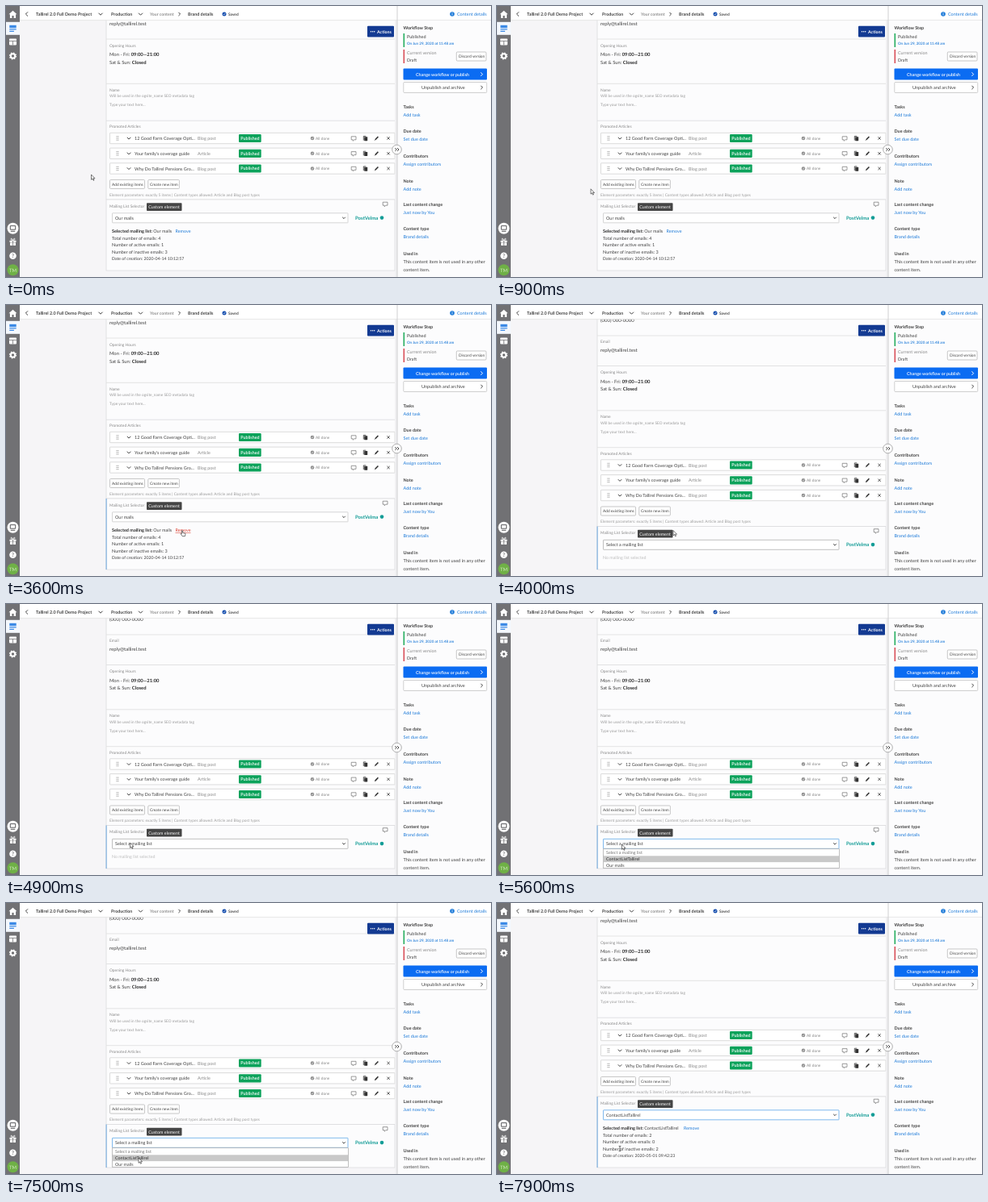
An HTML page for the animation above (8 s loop, 600 by 336 pixels).

```html
<!DOCTYPE html>
<html lang="en">
<head>
<meta charset="utf-8">
<title>Content editor</title>
<style>
  html, body { margin: 0; width: 100%; height: 100%; overflow: hidden; background: #f6f5f7; }
  svg { display: block; width: 600px; height: 336px; font-family: Lato, "Open Sans", sans-serif; text-rendering: geometricPrecision; }
  text { white-space: pre; }
</style>
</head>
<body>
<svg id="stage" viewBox="0 0 600 336"></svg>
<script>
const LOOP = 8000, SHIFT = 34.5;
const INK = '#404040', LABEL = '#878787', HINT = '#9a9a9a', LINK = '#1b79d8', LINE = '#dcdcde';
const stage = document.getElementById('stage');

function el(parent, tag, attrs, content) {
  const node = document.createElementNS('http://www.w3.org/2000/svg', tag);
  for (const key in attrs) node.setAttribute(key, attrs[key]);
  if (content !== undefined) node.textContent = content;
  parent.appendChild(node);
  return node;
}
const group = parent => el(parent, 'g', {});
const rect = (p, x, y, width, height, fill, more) => el(p, 'rect', { x, y, width, height, fill, ...more });
const circle = (p, cx, cy, r, fill, more) => el(p, 'circle', { cx, cy, r, fill, ...more });
const label = (p, x, y, str, size, fill = INK, weight = 400, more) =>
  el(p, 'text', { x, y, 'font-size': size, fill, 'font-weight': weight, ...more }, str);
const stroke = (p, d, color = INK, width = .8, more) =>
  el(p, 'path', { d, fill: 'none', stroke: color, 'stroke-width': width, ...more });
const box = (p, x, y, w, h, color, r = 1, fill = '#fff', width = .7) =>
  rect(p, x, y, w, h, fill, { rx: r, stroke: color, 'stroke-width': width });
const down = (p, x, y, s = 2.2, color = INK) =>
  stroke(p, `M${x - s} ${y - s / 2}l${s} ${s}l${s} ${-s}`, color, 1);
const right = (p, x, y, s = 2.2, color = INK) =>
  stroke(p, `M${x - s / 2} ${y - s}l${s} ${s}l${-s} ${s}`, color, 1);
const show = (node, on) => node.setAttribute('display', on ? 'inline' : 'none');

function bubble(p, x, y) {
  stroke(p, `M${x - 2.8} ${y - 2.2}h5.8v4h-2.2l-1.6 1.5v-1.5h-2z`, '#666', .65);
}

function articleRow(p, y, name, kind) {
  box(p, 128.5, y - 6.7, 352.5, 13.4, '#cdcdcd', .5);
  for (const dx of [0, 1.8])
    for (const dy of [-2.2, 0, 2.2]) rect(p, 136.5 + dx, y + dy - .5, 1, 1, '#8a8a8a');
  down(p, 152, y);
  label(p, 159, y + 2, name, 5.5);
  label(p, 237, y + 2, kind, 5.5, LABEL);
  rect(p, 288, y - 5.1, 27.7, 10.2, '#0ca25b', { rx: 1 });
  label(p, 290.3, y + 1.9, 'Published', 5.4, '#fff', 600);
  circle(p, 379, y, 2.3, '#8f8f8f');
  stroke(p, `M377.9 ${y}l.8 .9l1.5 -1.8`, '#fff', .6);
  label(p, 383, y + 1.8, 'All done', 4.8, LABEL);
  bubble(p, 430, y);
  stroke(p, `M442.3 ${y + 2.6}v-5.2h3`, '#333', .8);
  rect(p, 443.2, y - 1.8, 4, 5, '#333', { rx: .4 });
  stroke(p, `M456.8 ${y + 1.8}l3.6 -3.8`, '#333', 1.6);
  stroke(p, `M456 ${y + 2.7}l.8 -1`, '#333', .8);
  stroke(p, `M471.4 ${y - 1.7}l3.4 3.4m0 -3.4l-3.4 3.4`, '#333', .8);
}

function smallButton(p, x, y, w, h, str, tx) {
  box(p, x, y, w, h, '#b0b0b0');
  label(p, tx, y + h / 2 + 1.7, str, 4.8);
}

// Scrolling column
rect(stage, 0, 0, 600, 336, '#f6f5f7');
const page = group(stage);
rect(page, 124, -60, 357, 300, '#fcfcfd');
stroke(page, 'M124 -60V240', LINE, .8);
for (const y of [3.5, 41, 96.3, 142.2, 240]) stroke(page, `M124 ${y}H481`, LINE, .8);
label(page, 128, -13.7, '(000) 000-0000', 6);
label(page, 128, 12.2, 'Email', 4.9, LABEL);
label(page, 128, 23.8, 'reply@tallirel.test', 6);
label(page, 128, 50.6, 'Opening Hours', 4.9, LABEL);
for (const [y, day, hours] of [[62.2, 'Mon - Fri: ', '09:00—21:00'], [71.5, 'Sat & Sun: ', 'Closed']]) {
  const line = label(page, 128, y, '', 5.85);
  el(line, 'tspan', {}, day);
  el(line, 'tspan', { 'font-weight': 700, fill: '#2a2a2a' }, hours);
}
label(page, 128, 105.8, 'Name', 4.9, LABEL);
label(page, 128, 113.2, 'Will be used in the ogsite_name SEO metadata tag', 4.75, HINT);
label(page, 128, 124.3, 'Type your text here...', 4.85, HINT);
label(page, 128, 151.3, 'Promoted Articles', 4.9, LABEL);
articleRow(page, 164, '12 Good Farm Coverage Opti...', 'Blog post');
articleRow(page, 182.8, "Your family's coverage guide", 'Article');
articleRow(page, 201.5, 'Why Do Tallirel Pensions Gro...', 'Blog post');
smallButton(page, 128.5, 215.5, 43, 11, 'Add existing items', 131);
smallButton(page, 175.8, 215.5, 38.6, 11, 'Create new item', 178);
label(page, 128, 235.6, 'Element parameters: exactly 5 items | Content types allowed: Article and Blog post types', 4.8, HINT);

// Mailing list block
const block = group(page);
const panel = rect(block, 124, 240, 357, 88, '#fcfcfd', { stroke: LINE, 'stroke-width': .8 });
const edge = rect(block, 123.6, 240, 1, 88, '#6aa5dc');
label(block, 128, 249.7, 'Mailing List Selector', 4.9, LABEL);
rect(block, 174, 244.2, 43.5, 9.8, '#454545', { rx: .8 });
label(block, 176.3, 251, 'Custom element', 5.35, '#fff');
bubble(block, 469, 245.4);
const field = box(block, 131.5, 256.8, 291.5, 12, '#c4c4c4', .5);
const choice = label(block, 135, 264.8, '', 5.5);
down(block, 418, 262.7, 1.8);
label(block, 432, 264.8, 'PostVelma', 6.05, '#149d97', 700);
circle(block, 465, 262.6, 2.3, '#149d97');

function infoPanel(list, removeX, total, active, inactive, date) {
  const g = group(block);
  const line = label(g, 131, 281, '', 5.5);
  el(line, 'tspan', { 'font-weight': 700, fill: '#2a2a2a' }, 'Selected mailing list: ');
  el(line, 'tspan', {}, list);
  const link = label(g, removeX, 281, 'Remove', 5.4, LINK);
  label(g, 131, 289.8, 'Total number of emails: ' + total, 5.5);
  label(g, 131, 298.2, 'Number of active emails: ' + active, 5.5);
  label(g, 131, 306.7, 'Number of inactive emails: ' + inactive, 5.5);
  label(g, 131, 315.3, 'Date of creation: ' + date, 5.2);
  return { g, link };
}
const LISTS = ['Our mails', 'ContactListTallirel'];
const before = infoPanel(LISTS[0], 209.5, 4, 1, 3, '2020-04-14 10:12:57');
const after = infoPanel(LISTS[1], 231, 2, 0, 2, '2020-05-01 09:42:23');
const empty = label(block, 131, 280.9, 'No mailing list selected', 5.3, '#bdbdbd');

const menu = group(stage);
rect(menu, 131.5, 303.7, 292, 23.8, '#fff', { stroke: '#a6a6a6', 'stroke-width': .7 });
rect(menu, 132, 312.3, 291, 7.8, '#c9c9c9');
label(menu, 135, 310.4, 'Select a mailing list', 5.4, '#777');
label(menu, 135, 318, LISTS[1], 5.4, '#2a2a2a');
label(menu, 135, 325.6, LISTS[0], 5.4);

// Header
rect(stage, 17, 0, 583, 17.5, '#fff');
stroke(stage, 'M17 17.7H600', '#e0e0e0', .8);
stroke(stage, 'M27 7.4l-2.6 2.6l2.6 2.6', INK, 1);
label(stage, 37, 12, 'Tallirel 2.0 Full Demo Project', 5.45, INK, 700);
down(stage, 117, 10, 2.5);
label(stage, 130, 12, 'Production', 5.3, INK, 700);
down(stage, 166.5, 10, 2.5);
label(stage, 178, 12, 'Your content', 5.2, '#8d8d8d', 700);
right(stage, 214.5, 10, 2.1);
label(stage, 225, 12, 'Brand details', 5.4, INK, 700);
circle(stage, 270, 10, 2.5, '#164fae');
stroke(stage, 'M268.8 10l.9 1l1.6 -2', '#fff', .6);
label(stage, 275, 11.8, 'Saved', 4.8, '#333', 600);
rect(stage, 447, 24.8, 33, 13.6, '#133a92', { rx: 1 });
for (const x of [451.5, 453.6, 455.7]) circle(stage, x, 31.8, .75, '#fff');
label(stage, 459, 33.7, 'Actions', 5.3, '#fff', 700);

// Details panel
rect(stage, 481.4, 18, 3, 318, '#efeff1');
rect(stage, 484, 18, 116, 318, '#fcfcfd');
stroke(stage, 'M484 0V336', '#cfcfd1', 1);
circle(stage, 552, 10, 2.8, LINK);
rect(stage, 551.6, 9.4, .8, 2, '#fff');
rect(stage, 551.6, 8.2, .8, .7, '#fff');
label(stage, 558, 12, 'Content details', 5.5, LINK);
label(stage, 491.5, 29.4, 'Workflow Step', 5.5, INK, 700);
rect(stage, 491.5, 34, 1.6, 17, '#27ae60');
rect(stage, 491.5, 54, 1.6, 17, '#d9505a');
label(stage, 496, 40.2, 'Published', 5.5);
label(stage, 496, 48.4, 'On Jun 29, 2020 at 11:48 am', 4.55, LINK, 600);
label(stage, 496, 60, 'Current version', 5.4, LABEL);
label(stage, 496, 68.8, 'Draft', 5.3);
smallButton(stage, 557.3, 57, 36.7, 11, 'Discard version', 560);
rect(stage, 491.5, 77.6, 103.5, 13.8, '#0b6cf2', { rx: 1 });
label(stage, 507, 86.6, 'Change workflow or publish', 5.35, '#fff', 600);
right(stage, 588.5, 84.6, 2.2, '#fff');
box(stage, 491.8, 94.5, 102.9, 13, '#bcbcbc');
label(stage, 514, 102.9, 'Unpublish and archive', 5.55);
right(stage, 588.5, 101, 2.2);
const facts = [
  [127, 'Tasks', 'Add task'], [156.9, 'Due date', 'Set due date'], [187.7, 'Contributors', 'Assign contributors'],
  [218.5, 'Note', 'Add note'], [248.3, 'Last content change', 'Just now by You'], [277.8, 'Content type', 'Brand details']
];
for (const [y, title, link] of facts) {
  label(stage, 491.5, y, title, 5.45, INK, 700);
  label(stage, 491.5, y + 10, link, 5.5, LINK);
}
label(stage, 491.5, 309, 'Used in', 5.45, INK, 700);
label(stage, 491.5, 319, 'This content item is not used in any other', 5.6);
label(stage, 491.5, 328.6, 'content item.', 5.6);
circle(stage, 483.5, 178, 5.8, '#fff', { stroke: '#8d8d8d', 'stroke-width': .7 });
right(stage, 482.3, 178, 1.9);
right(stage, 485, 178, 1.9);

// Sidebar
rect(stage, 0, 0, 17, 336, '#717174');
el(stage, 'path', { d: 'M8.5 5.8l5 4.5h-1.4v4.7h-2.5v-3h-2.2v3h-2.5v-4.7h-1.4z', fill: '#fff' });
rect(stage, 0, 19.8, 17, 16, '#f4f8fd');
rect(stage, 4.3, 23.8, 8.4, 3.4, '#3c8ae6');
stroke(stage, 'M4.3 28.9h8.4M4.3 31.4h5.6', '#3c8ae6', 1.3);
rect(stage, 4, 40.4, 9, 8, '#fff', { rx: .8 });
stroke(stage, 'M4 43.4h9M8.5 43.4v5', '#717174', .8);
circle(stage, 8.5, 62, 2.7, 'none', { stroke: '#fff', 'stroke-width': 2 });
circle(stage, 8.5, 62, 4, 'none', { stroke: '#fff', 'stroke-width': 1.2, 'stroke-dasharray': '1.57 1.57' });
circle(stage, 8.5, 275.8, 7, '#fff');
stroke(stage, 'M5.3 272.6h6.4v4.6h-6.4zM5.8 279.3h5.4', '#5a5a5d', 1);
rect(stage, 4.5, 290.8, 8, 2, '#fff');
rect(stage, 5, 293.3, 7, 3.6, '#fff');
stroke(stage, 'M8.5 290.8v6', '#717174', .8);
stroke(stage, 'M8.5 290.5c-3.5 0 -3 -3 -1.2 -2l1.2 2l1.2 -2c1.8 -1 2.3 2 -1.2 2', '#fff', .8);
circle(stage, 8.5, 309.8, 4.3, '#fff');
label(stage, 8.5, 312.1, '?', 6.5, '#717174', 700, { 'text-anchor': 'middle' });
circle(stage, 8.5, 327.3, 7, '#6fb046');
label(stage, 8.5, 329.5, 'TM', 6, '#d6ebc6', 400, { 'text-anchor': 'middle' });

// Pointer shapes, each with its hot spot at 0,0
const pointer = group(stage);
const shapes = {
  arrow: el(pointer, 'path', { d: 'M0 0v6.3l1.5 -1.3l1 2.3l1 -.4l-1 -2.2h2z', fill: '#fff', stroke: '#222', 'stroke-width': .6 }),
  beam: stroke(pointer, 'M-1.3 -3.2q1.3 0 1.3 .7v5q0 .7 -1.3 .7M1.3 -3.2q-1.3 0 -1.3 .7M1.3 3.2q-1.3 0 -1.3 -.7', '#222', .7),
  hand: el(pointer, 'path', {
    d: 'M-.6 .3q.6 -.8 1.2 0v2.5l2.8 .7q.7 .2 .6 1l-.6 2.7h-3.2l-2.2 -3q.2 -.8 1.4 0z',
    fill: '#fff', stroke: '#222', 'stroke-width': .6
  })
};

const path = [
  [0, 105.5, 209], [600, 105.5, 209], [1700, 163, 306], [2800, 163, 306], [3400, 218, 279.5],
  [4100, 218, 279.5], [4700, 153.5, 296], [5500, 153.5, 296], [6000, 163, 315], [7100, 163, 315],
  [7400, 164, 316], [7600, 164, 316], [7800, 152, 304.5], [LOOP, 152, 304.5]
];
const kinds = [[0, 'arrow'], [1250, 'beam'], [3200, 'hand'], [4000, 'arrow'], [7700, 'beam']];

function pointerAt(t) {
  const i = path.findIndex(k => k[0] > t);
  const [t0, x0, y0] = path[i - 1], [t1, x1, y1] = path[i];
  const u = (t - t0) / (t1 - t0), e = u * u * (3 - 2 * u);
  return [x0 + (x1 - x0) * e, y0 + (y1 - y0) * e];
}

function render(t) {
  const [x, y] = pointerAt(t);
  const kind = kinds.filter(k => k[0] <= t).pop()[1];
  pointer.setAttribute('transform', `translate(${x} ${y})`);
  for (const name in shapes) show(shapes[name], name === kind);

  const cleared = t >= 4000 && t < 7600, chosen = t >= 7600;
  page.setAttribute('transform', `translate(0 ${cleared ? SHIFT : 0})`);
  for (const node of [panel, edge]) node.setAttribute('height', cleared ? 88 - SHIFT : 88);
  show(edge, y > 240);
  show(before.g, t < 4000);
  show(empty, cleared);
  show(after.g, chosen);
  show(menu, t >= 5300 && t < 7600);
  choice.textContent = cleared ? 'Select a mailing list' : LISTS[chosen ? 1 : 0];
  field.setAttribute('stroke', t >= 5300 ? '#4a9ce6' : cleared ? '#a5a5a5' : '#c4c4c4');
  before.link.setAttribute('fill', kind === 'hand' ? '#dc3a2c' : LINK);
  before.link.setAttribute('text-decoration', kind === 'hand' ? 'underline' : 'none');
}

const start = performance.now();
function tick() {
  render((performance.now() - start) % LOOP);
  requestAnimationFrame(tick);
}
tick();
</script>
</body>
</html>
```
